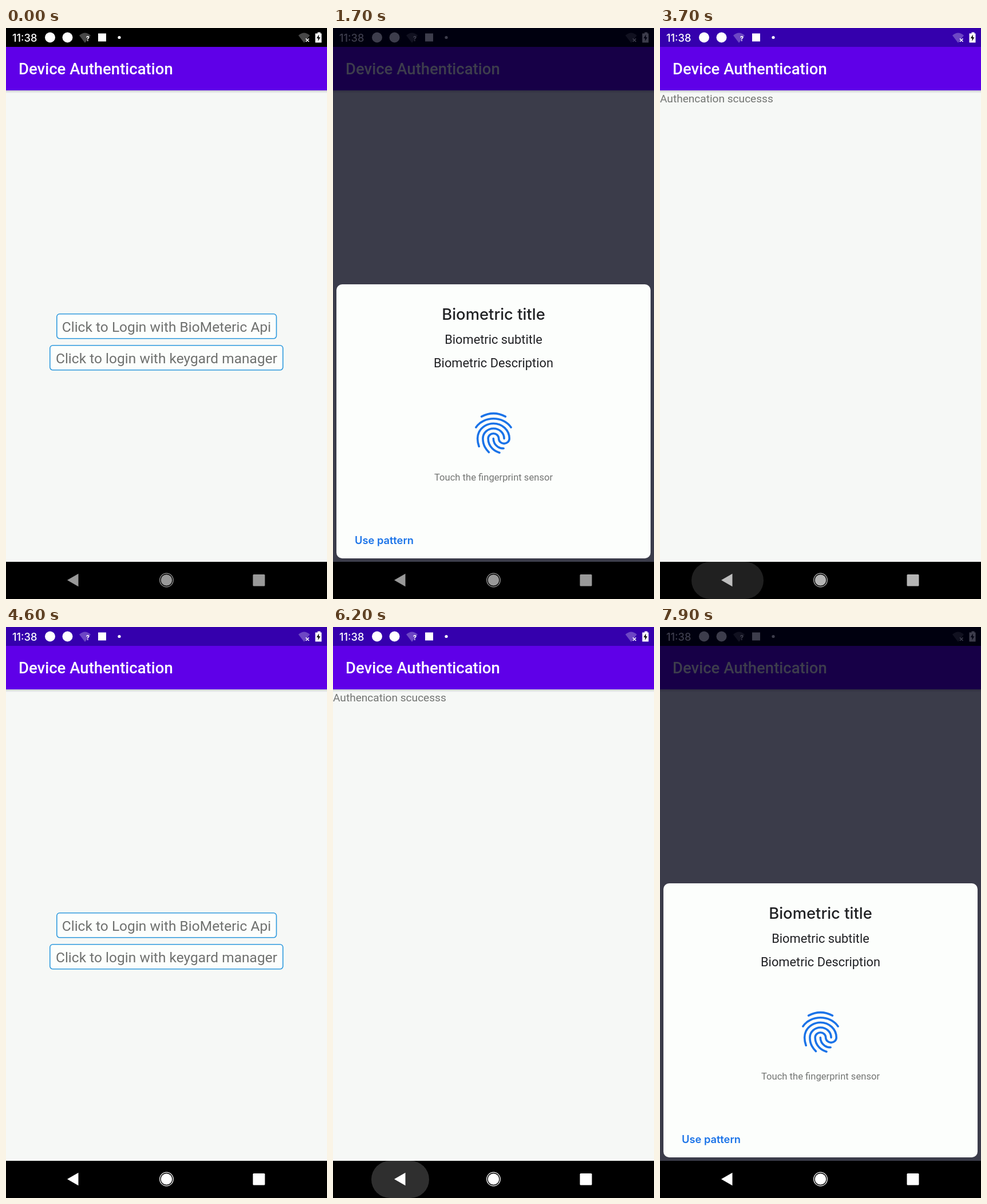
Write an HTML page that moves like this. It is 561 by 998 pixels and loops after 8 s.

```html
<!DOCTYPE html>
<html lang="en">
<head>
<meta charset="utf-8">
<title>Device Authentication</title>
<style>
@property --a { syntax: "<number>"; inherits: true; initial-value: 0 }
@property --b { syntax: "<number>"; inherits: true; initial-value: 0 }

html, body { margin: 0; width: 100%; height: 100%; overflow: hidden; background: #000 }
svg { display: block; width: 561px; height: 998px; font-family: Roboto, sans-serif;
  animation: first 8s step-end infinite, second 8s step-end infinite }

.main, .done { transform-origin: 280.5px 466px }
.main { animation: main 8s linear infinite }
.done { animation: done 8s linear infinite }
.bar { animation: bar 8s step-end infinite }
.nav { animation: nav 8s linear infinite }
.ripple { fill: #fff; animation: ripple 8s step-end infinite }

.first { opacity: var(--a) }
.second { opacity: var(--b) }
.first .card { transform: translateY(calc((1 - var(--a)) * 464px)) }
.second .card { transform: translateY(calc((1 - var(--b)) * 464px)) }

.title { font-size: 27.5px; font-weight: 500; fill: #fff }
.button rect { fill: #fcfefc; stroke: #2f9ade; stroke-width: 1.6 }
.button text { font-size: 24.55px; fill: #6f716f }
.mid, .button text { text-anchor: middle }
.head { font: 500 27.4px Inter, sans-serif }
.body { font-size: 21.8px }
.hint { font-size: 16.6px; fill: #737573 }
.link { font: 600 18.3px Inter, sans-serif; fill: #1a73e8 }
.card { fill: #202124 }

@keyframes first {
  0% { --a: 0 } 3.75% { --a: .59 } 5% { --a: .9 } 6.25% { --a: 1 }
  32.5% { --a: .5 } 33.75% { --a: .2 } 35% { --a: 0 }
  92.5% { --a: .59 } 93.75% { --a: .9 } 95%, 100% { --a: 1 }
}
@keyframes second {
  0% { --b: 0 } 66.25% { --b: .587 } 67.5% { --b: .9 } 68.75% { --b: 1 }
  71.25% { --b: .5 } 72.5% { --b: .2 } 73.75%, 100% { --b: 0 }
}
@keyframes main {
  0%, 28.8% { opacity: 1; transform: none }
  31%, 47.5% { opacity: 0; transform: scale(1.1) }
  48.75% { opacity: 1; transform: scale(1.03) }
  50% { transform: scale(1.01) }
  53.75%, 70% { opacity: 1; transform: none }
  71.25%, 80.6% { opacity: 0; transform: scale(1.1) }
  81.9% { opacity: 1; transform: scale(1.03) }
  83.1% { transform: scale(1.01) }
  86.25%, 100% { opacity: 1; transform: none }
}
@keyframes done {
  0%, 33.75% { opacity: 0; transform: scale(.85) }
  35% { opacity: 1; transform: scale(.97) }
  38.75%, 47.5% { opacity: 1; transform: none }
  49.4% { opacity: 0; transform: scale(.9) }
  71.8% { opacity: 0; transform: scale(.85) }
  73.1% { opacity: 1; transform: scale(.97) }
  75%, 80.6% { opacity: 1; transform: none }
  82.5%, 100% { opacity: 0; transform: scale(.9) }
}
@keyframes bar { 0% { fill: #000 } 32.5% { fill: #3500ad } 81% { fill: #000 } }
@keyframes nav { 0%, 44.4% { opacity: .6 } 46.25% { opacity: .71 } 50%, 100% { opacity: 1 } }
@keyframes ripple {
  0% { x: 67px; width: 101px; opacity: 0 }
  45%, 77.5% { x: 67px; width: 101px; opacity: .185 }
  46.25%, 78.75% { x: 55px; width: 126px; opacity: .127 }
  47.5%, 80% { x: 55px; width: 126px; opacity: .08 }
  48.75%, 81.25%, 100% { x: 55px; width: 126px; opacity: 0 }
}
</style>
</head>
<body>
<svg viewBox="0 0 561 998">
  <defs>
    <linearGradient id="shade" x2="0" y2="1">
      <stop stop-color="#c9cbd0"/><stop offset="1" stop-color="#f6f8f6"/>
    </linearGradient>
    <g id="page">
      <rect y="109" width="561" height="824" fill="#f6f8f6"/>
      <rect y="109" width="561" height="5" fill="url(#shade)"/>
      <rect y="33" width="561" height="76" fill="#5f00e8"/>
      <text class="title" x="22" y="81">Device Authentication</text>
    </g>
    <path id="finger" transform="translate(237.3 664.8) scale(3.6)" fill="none" stroke="#1a73e8" stroke-linecap="round"
      d="M6.2 4Q12 .9 17.8 4M3.5 9.2C7.3 3.6 16.7 3.6 20.5 9.2
      M14.9 21.5c-1.5-.42-2.45-.97-3.47-1.98-1.3-1.3-2.04-3-2.04-4.86 0-1.35 1.15-2.44 2.58-2.44s2.58 1.09 2.58 2.44c0 1.35 1.15 2.44 2.58 2.44s2.58-1.09 2.58-2.44c0-4.05-3.48-7.33-7.75-7.33-3.03 0-5.81 1.7-7.06 4.33-.43.9-.64 1.9-.64 3 0 .8.07 2.1.7 3.8
      M9.75 21.3c-.85-.86-1.3-1.4-1.93-2.54-.64-1.15-.98-2.57-.98-4.1 0-2.7 2.3-4.89 5.16-4.89s5.16 2.19 5.16 4.89
      M16.9 19.45c-1.09 0-2-.27-2.82-.8-1.35-.92-2.14-2.4-2.14-4"/>
    <path id="wifi" d="M0 5Q10 -4 20 5L10 18Z" fill="#fff" opacity=".28"/>
  </defs>

  <g class="main">
    <use href="#page"/>
    <rect class="bar" width="561" height="33"/>
    <g class="button">
      <rect x="88.8" y="499.8" width="383.8" height="43" rx="5"/>
      <text x="280.5" y="531">Click to Login with BioMeteric Api</text>
      <rect x="76.8" y="554.8" width="407.2" height="43" rx="5"/>
      <text x="280.5" y="586">Click to login with keygard manager</text>
    </g>
  </g>

  <g class="done">
    <use href="#page"/>
    <rect width="561" height="33" fill="#3500ad"/>
    <text x="0" y="130" font-size="19.1" fill="#737573">Authencation scucesss</text>
  </g>

  <g fill="#fff">
    <text x="11" y="23.5" font-family="Inter, sans-serif" font-size="18.2" font-weight="500">11:38</text>
    <circle cx="77" cy="16.5" r="9"/>
    <circle cx="107.5" cy="16.5" r="9"/>
    <use href="#wifi" x="128" y="8"/>
    <text x="140" y="23" font-size="12" font-weight="700">?</text>
    <rect x="161" y="9.5" width="14" height="14"/>
    <circle cx="198" cy="16.5" r="2.6"/>
    <use href="#wifi" x="511" y="8"/>
    <path d="M524 18.5l5.5 5.5m0-5.5l-5.5 5.5" stroke="#fff" stroke-width="1.7"/>
    <path d="M542.5 9.5h2v-2h5v2h2v16h-11v-16z"/>
    <path d="M546.8 11.5l-4 6.5h2.6v5l4-6.7h-2.6z" fill="#111"/>
  </g>

  <g class="first">
    <rect width="561" height="933" fill="#000014" opacity=".76"/>
    <g class="card">
      <rect x="6" y="448" width="549" height="479" rx="10" fill="#fcfefc"/>
      <text class="mid head" x="280.5" y="510">Biometric title</text>
      <text class="mid body" x="280.5" y="552">Biometric subtitle</text>
      <text class="mid body" x="280.5" y="593">Biometric Description</text>
      <use href="#finger"/>
      <text class="mid hint" x="280.5" y="791">Touch the fingerprint sensor</text>
      <text class="link" x="38" y="901.5">Use pattern</text>
    </g>
  </g>

  <g class="second">
    <rect width="561" height="933" fill="#000014" opacity=".76"/>
    <g class="card">
      <rect x="6" y="489" width="549" height="438" rx="10" fill="#fcfefc"/>
      <text class="mid head" x="280.5" y="550">title</text>
      <text class="mid body" x="280.5" y="593">description</text>
      <use href="#finger"/>
      <text class="mid hint" x="280.5" y="791">Touch the fingerprint sensor</text>
      <text class="link" x="38" y="901.5">Use pattern</text>
    </g>
  </g>

  <rect y="933" width="561" height="65"/>
  <rect class="ripple" y="933" height="65" rx="32.5"/>
  <g class="nav" fill="#fff">
    <path d="M107 965l19.5-11.3v22.6z"/>
    <circle cx="280.5" cy="965" r="9.8"/>
    <circle cx="280.5" cy="965" r="11.8" fill="none" stroke="#fff" stroke-width="1.3"/>
    <rect x="431.5" y="955" width="21" height="20.5" rx="1.5"/>
  </g>
</svg>
</body>
</html>
```
